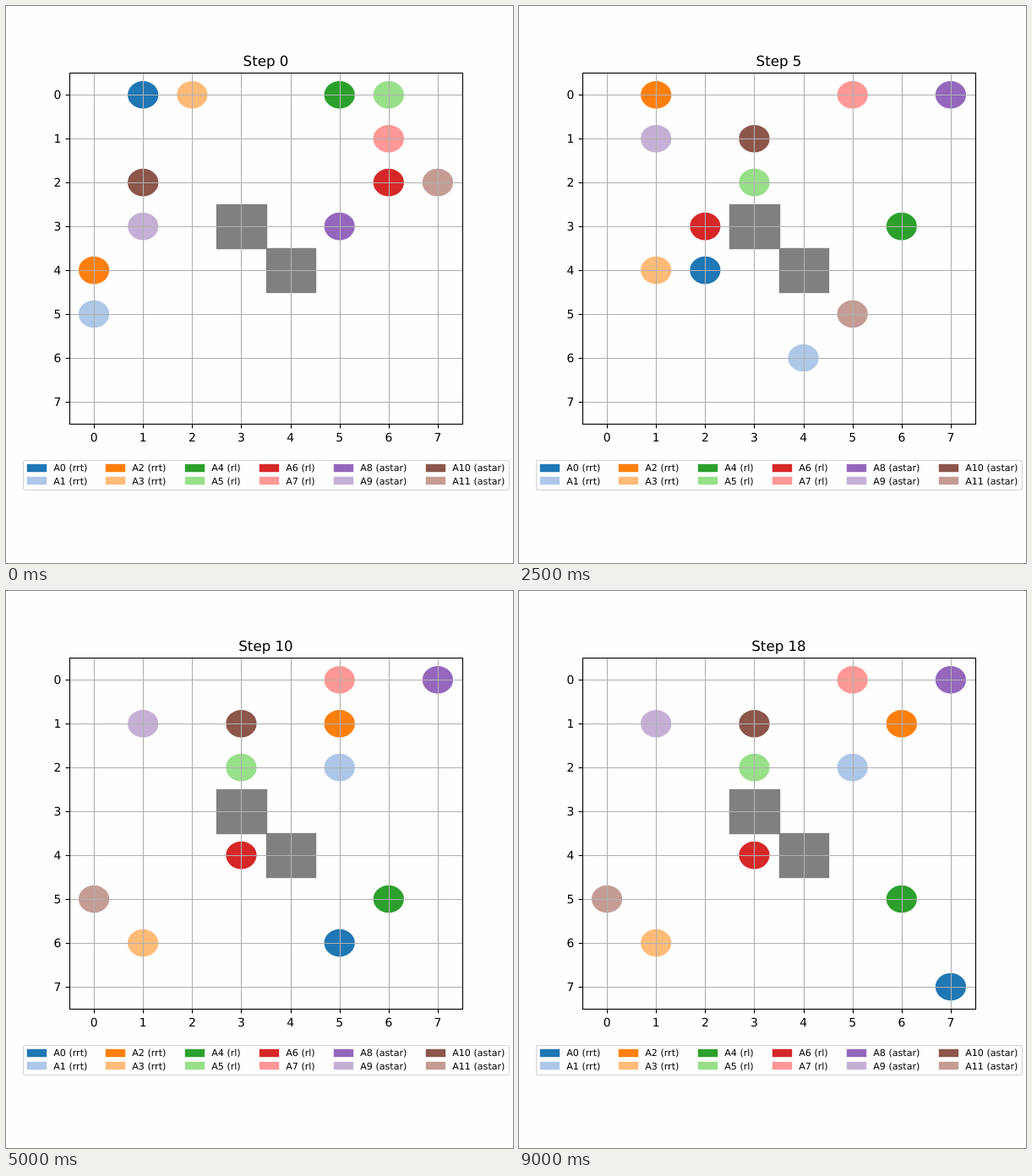
These frames come from a looping animation (600x660 px, 9500 ms). An HTML page:

```html
<!DOCTYPE html>
<html lang="en">
<head>
<meta charset="utf-8">
<title>Agents on a grid</title>
<style>
  html, body { margin: 0; width: 600px; height: 660px; overflow: hidden; background: #fefefe; }
  svg { display: block; font-family: "DejaVu Sans", Verdana, sans-serif; font-size: 13.89px; text-rendering: geometricPrecision; }
</style>
</head>
<body>
<svg id="stage" width="600" height="660" viewBox="0 0 600 660"></svg>
<script>
const STEP_MS = 500, STEPS = 19;
const LEFT = 75, TOP = 79.2, CELL_W = 58.125, CELL_H = 51.975;
const stage = document.getElementById("stage");

// start column, start row, moves (one letter per step, "." waits), colour, planner
const agents = [
  [1, 0, "DRDDDDDRRRRRD", "#1f77b4", "rrt"],
  [0, 5, "RDRRRRUUUU", "#aec7e8", "rrt"],
  [0, 4, "UUUURRRRDRR", "#ff7f0e", "rrt"],
  [2, 0, "DDLDDDD", "#ffbb78", "rrt"],
  [5, 0, ".RDDDDD", "#2ca02c", "rl"],
  [6, 0, "DLLLD", "#98df8a", "rl"],
  [6, 2, "LLLLDDR", "#d62728", "rl"],
  [6, 1, "LU", "#ff9896", "rl"],
  [5, 3, "RURUU", "#9467bd", "astar"],
  [1, 3, ".UU", "#c5b0d5", "astar"],
  [1, 2, ".UR.R", "#8c564b", "astar"],
  [7, 2, "LLDDDLLLLL", "#c49c94", "astar"],
];
const moves = { R: [1, 0], L: [-1, 0], U: [0, -1], D: [0, 1], ".": [0, 0] };

const colX = c => LEFT + (c + 0.5) * CELL_W;
const rowY = r => TOP + (r + 0.5) * CELL_H;
const snap = v => Math.round(v) + 0.5;

function add(tag, attrs, text = "") {
  const el = document.createElementNS("http://www.w3.org/2000/svg", tag);
  for (const key in attrs) el.setAttribute(key, attrs[key]);
  el.textContent = text;
  return stage.appendChild(el);
}
const line = (x1, y1, x2, y2, stroke) => add("line", { x1, y1, x2, y2, stroke, "stroke-width": 1.11 });
const block = (x, y, width, height, color) =>
  add("rect", { x, y, width, height, fill: color, stroke: color, "stroke-width": 1.39 });

// obstacles
for (const [c, r] of [[3, 3], [4, 4]]) {
  const x = snap(LEFT + c * CELL_W), y = snap(TOP + r * CELL_H);
  block(x, y, snap(LEFT + (c + 1) * CELL_W) - x, snap(TOP + (r + 1) * CELL_H) - y, "#808080");
}

const discs = agents.map(([, , , color]) =>
  add("ellipse", { rx: 0.3 * CELL_W, ry: 0.3 * CELL_H, fill: color, stroke: color, "stroke-width": 1.39 }));

// grid, ticks and axis labels
for (let i = 0; i < 8; i++) {
  const x = snap(colX(i)), y = snap(rowY(i));
  line(x, 79.5, x, 495.5, "#b0b0b0");
  line(75.5, y, 540.5, y, "#b0b0b0");
  line(x, 495.5, x, 500.4, "#000");
  line(70.6, y, 75.5, y, "#000");
  add("text", { x: colX(i), y: 516, "text-anchor": "middle" }, i);
  add("text", { x: 65.3, y: Math.round(rowY(i)) + 5.3, "text-anchor": "end" }, i);
}
add("rect", { x: 75.5, y: 79.5, width: 465, height: 416, fill: "none", stroke: "#000", "stroke-width": 1.11 });

// legend
add("rect", { x: 20.5, y: 538.5, width: 575, height: 35, rx: 2.2, fill: "#fefefe", stroke: "#d4d4d4", "stroke-width": 1.11 });
const legendX = [25, 118, 212, 300, 388, 497];
agents.forEach(([, , , color, planner], i) => {
  const x = legendX[i >> 1], y = 543.5 + (i % 2) * 15;
  block(x + 0.5, y, 22, 8, color);
  add("text", { x: x + 31.2, y: y + 7.8 + (i % 2) * 0.5, "font-size": 11.11 }, `A${i} (${planner})`);
});

const title = add("text", { x: 307.5, y: 71, "text-anchor": "middle", "font-size": 16.67 });

function draw(now) {
  const step = Math.floor(now / STEP_MS) % STEPS;
  title.textContent = `Step ${step}`;
  agents.forEach(([c, r, path], i) => {
    for (const m of path.slice(0, step)) {
      c += moves[m][0];
      r += moves[m][1];
    }
    discs[i].setAttribute("cx", colX(c));
    discs[i].setAttribute("cy", rowY(r));
  });
}
function tick() {
  draw(performance.now());
  requestAnimationFrame(tick);
}
tick();
</script>
</body>
</html>
```
